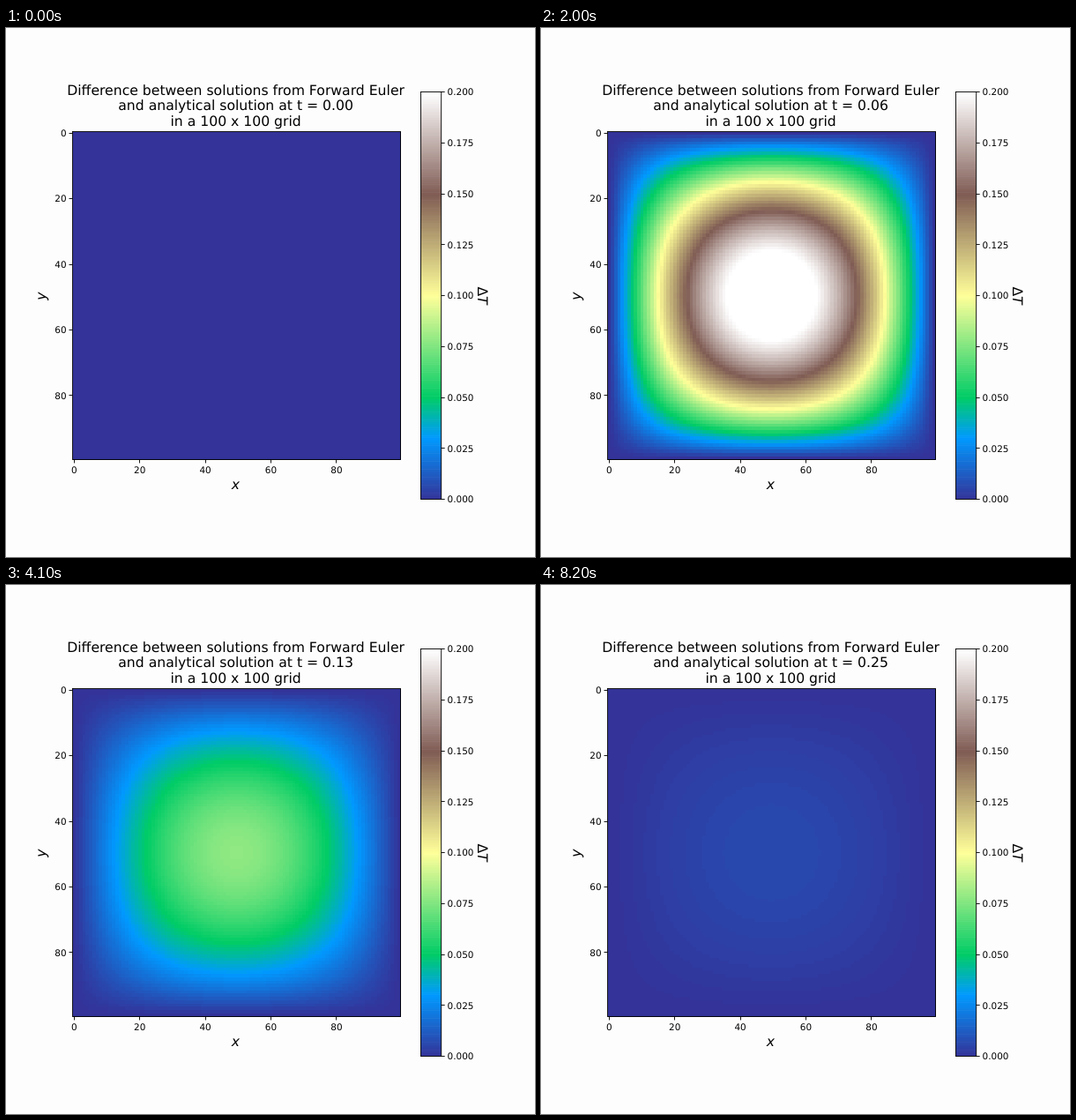
These frames come from a looping animation (600x600 px, 8300 ms). An HTML page with a canvas:

```html
<!DOCTYPE html>
<html lang="en">
<head>
<meta charset="utf-8">
<title>Heat equation difference</title>
<style>
  html, body { margin: 0; width: 100%; height: 100%; overflow: hidden; background: #fefdfe; }
  canvas, svg { position: absolute; left: 0; top: 0; width: 600px; height: 600px; }
  text {
    font-family: "DejaVu Sans", sans-serif;
    font-size: 10.43px;
    fill: #000;
    text-rendering: geometricPrecision;
  }
  .big { font-size: 15.65px; }
  .mid { text-anchor: middle; }
  .end { text-anchor: end; }
  .it { font-style: italic; }
  rect, line { fill: none; stroke: #000; stroke-width: 0.9; }
</style>
</head>
<body>
<canvas id="plot" width="600" height="600"></canvas>
<svg id="chart" viewBox="0 0 600 600">
  <rect x="75.5" y="117.5" width="372" height="372"/>
  <rect x="470.5" y="72.5" width="23.2" height="462"/>
  <text class="big mid" x="260.6" y="75.8">Difference between solutions from Forward Euler</text>
  <text class="big mid" x="260.6" y="93.2" id="clock">and analytical solution at t = 0.00</text>
  <text class="big mid" x="260.6" y="110.9">in a 100 x 100 grid</text>
  <text class="big mid it" x="260.5" y="522.6">x</text>
  <text class="big mid it" transform="translate(44.5 304) rotate(-90)">y</text>
  <text class="big mid" transform="translate(534.5 303.5) rotate(90)">Δ<tspan class="it">T</tspan></text>
</svg>
<script>
  const N = 100, LEVELS = 256, VMAX = 0.2;
  const FRAME = 100, FRAMES = 83, DT = 0.003065;
  const SLOW = 2 * Math.PI ** 2, FAST = 41.6;

  // Terrain colour map: position, then red, green, blue
  const STOPS = [
    [0, 51, 51, 153], [0.15, 0, 153, 255], [0.25, 0, 204, 102],
    [0.5, 255, 255, 153], [0.75, 128, 92, 84], [1, 255, 255, 255]
  ];

  function terrain(v) {
    let i = 1;
    while (i < STOPS.length - 1 && v > STOPS[i][0]) i++;
    const a = STOPS[i - 1], b = STOPS[i];
    const u = (v - a[0]) / (b[0] - a[0]);
    return [1, 2, 3].map(k => Math.round(a[k] + (b[k] - a[k]) * u));
  }

  const palette = Array.from({ length: LEVELS }, (_, i) => terrain(i / (LEVELS - 1)));
  const wave = Array.from({ length: N }, (_, i) => Math.sin(Math.PI * i / (N - 1)));

  const chart = document.getElementById('chart');
  const clock = document.getElementById('clock');
  const ctx = document.getElementById('plot').getContext('2d');
  const grid = document.createElement('canvas');
  grid.width = grid.height = N;
  const gridCtx = grid.getContext('2d');
  const cells = gridCtx.createImageData(N, N);

  function add(tag, attrs, label) {
    const el = document.createElementNS(chart.namespaceURI, tag);
    for (const key in attrs) el.setAttribute(key, attrs[key]);
    if (label !== undefined) el.textContent = label;
    chart.appendChild(el);
  }

  const snap = v => Math.floor(v) + 0.5;

  function drawAxes() {
    for (let i = 0; i < 5; i++) {
      const x = 77.3 + 74.4 * i, y = 119.3 + 74.4 * i;
      add('line', { x1: snap(x), x2: snap(x), y1: 489.5, y2: 493.5 });
      add('line', { x1: 71.5, x2: 75.5, y1: snap(y), y2: snap(y) });
      add('text', { class: 'mid', x, y: 505 }, i * 20);
      add('text', { class: 'end', x: 68.6, y: y + 3.6 }, i * 20);
    }
    for (let i = 0; i <= 8; i++) {
      const y = 534.5 - 57.75 * i;
      add('line', { x1: 493.7, x2: 497.7, y1: snap(y), y2: snap(y) });
      add('text', { x: 500.6, y: y + 3.8 }, (i * 0.025).toFixed(3));
    }
  }

  function drawBar() {
    const h = 462 / LEVELS;
    palette.forEach((c, i) => {
      const y = 534.5 - h * (i + 1);
      ctx.fillStyle = `rgb(${c})`;
      ctx.fillRect(470.5, y, 23.2, Math.min(h + 0.6, 534.5 - y));
    });
  }

  function drawField(t) {
    const amp = Math.exp(-SLOW * t) - Math.exp(-FAST * t);
    for (let j = 0, p = 0; j < N; j++) {
      for (let i = 0; i < N; i++, p += 4) {
        const v = amp * wave[i] * wave[j] / VMAX;
        const level = Math.max(0, Math.min(LEVELS - 1, Math.floor(v * LEVELS)));
        const c = palette[level];
        cells.data[p] = c[0];
        cells.data[p + 1] = c[1];
        cells.data[p + 2] = c[2];
        cells.data[p + 3] = 255;
      }
    }
    gridCtx.putImageData(cells, 0, 0);
    ctx.imageSmoothingEnabled = false;
    ctx.drawImage(grid, 75.5, 117.5, 372, 372);
    clock.textContent = 'and analytical solution at t = ' + t.toFixed(2);
  }

  let shown = -1;
  function tick() {
    const step = Math.floor(performance.now() / FRAME) % FRAMES;
    if (step !== shown) {
      shown = step;
      drawField(step * DT);
    }
    requestAnimationFrame(tick);
  }

  drawAxes();
  drawBar();
  tick();
</script>
</body>
</html>
```
